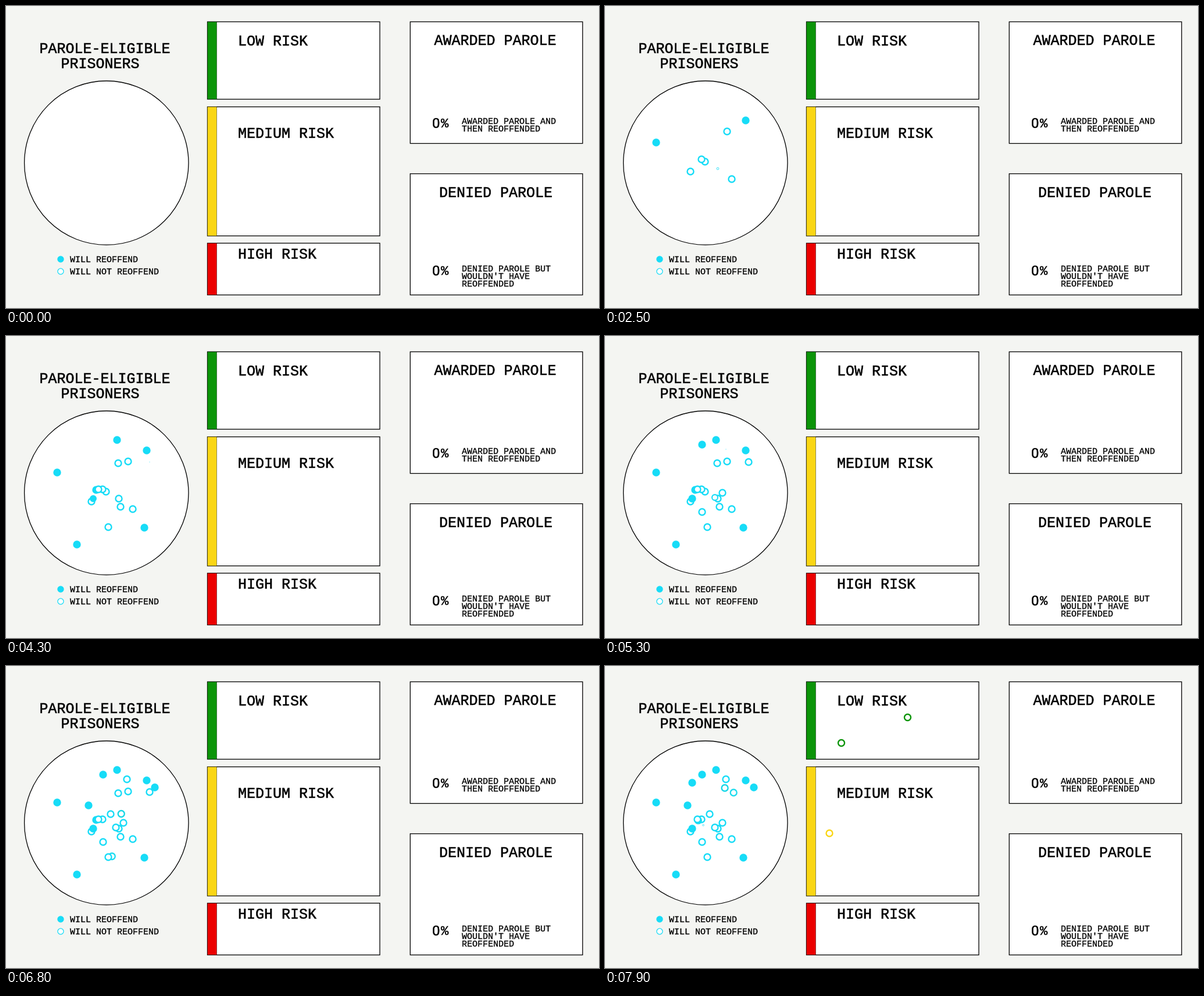
An HTML page for the animation above (8000 ms loop, 1020 px wide and 520 px high).

```html
<!DOCTYPE html>
<html lang="en">
<head>
<meta charset="utf-8">
<title>Parole risk</title>
<style>
  html, body { margin: 0; width: 100%; height: 100%; overflow: hidden; background: #f4f5f2; }
  svg { display: block; }
  text { font-family: "Liberation Mono", "Courier New", monospace; stroke: #000; stroke-width: .022em; }
  .title { font-size: 25px; }
  .label { font-size: 15px; }
  .zero { font: 24px Roboto, sans-serif; }
  .percent { font-size: 22px; }
  .frame { fill: #fff; stroke: #000; stroke-width: 1.3; }
  .bar { stroke: #000; stroke-opacity: .6; stroke-width: .7; }
</style>
</head>
<body>
<svg id="stage" width="1020" height="520" viewBox="0 0 1020 520"></svg>
<script>
const stage = document.getElementById("stage");
const LOOP = 8000, GROW = 500, TRAVEL = 1000;
const CYAN = [23, 220, 247], GREEN = [12, 148, 9], YELLOW = [250, 214, 21], RED = [235, 0, 0];

const rgb = color => `rgb(${color.map(Math.round)})`;
const mix = (a, b, k) => a + (b - a) * k;
function ease(u) {
  u = Math.min(1, Math.max(0, u));
  return u < .5 ? 4 * u ** 3 : 1 - 4 * (1 - u) ** 3;
}

function set(node, attrs) {
  for (const key in attrs) node.setAttribute(key, attrs[key]);
  return node;
}
function add(tag, attrs, content = "") {
  const node = set(document.createElementNS("http://www.w3.org/2000/svg", tag), attrs);
  node.textContent = content;
  return stage.appendChild(node);
}
const text = (x, y, content, cls = "title") => add("text", { x, y, class: cls }, content);
const box = (x, y, height) => add("rect", { x, y, width: 296.5, height, class: "frame" });

function riskBox(y, height, color, title, titleY) {
  box(346.5, y, height);
  add("rect", { x: 346.5, y, width: 16, height, fill: rgb(color), class: "bar" });
  text(399, titleY, title);
}

function outcomeBox(y, height, title, titleX, rowY, rows) {
  box(695.3, y, height);
  text(titleX, y + 40, title);
  text(733, rowY + 6.5, "0", "zero");
  text(748, rowY + 6, "%", "percent");
  rows.forEach((row, i) => text(784, rowY + 13 * i, row, "label"));
}

function drawDot(node, x, y, size, color, filled, line = 2.4) {
  set(node, {
    cx: x, cy: y, r: 5.5 * size, "stroke-width": line * size,
    stroke: rgb(color), fill: filled ? rgb(color) : "#fff"
  });
}

text(57.5, 80.5, "PAROLE-ELIGIBLE");
text(94.5, 106.5, "PRISONERS");
add("circle", { cx: 172.8, cy: 270.2, r: 141.2, class: "frame" });
["WILL REOFFEND", "WILL NOT REOFFEND"].forEach((label, i) => {
  const y = 436 + 21 * i;
  drawDot(add("circle", {}), 94, y, .92, CYAN, i === 0, 1.4);
  text(110, y + 4.5, label, "label");
});
riskBox(27.2, 133.3, GREEN, "LOW RISK", 67.5);
riskBox(173.6, 222.2, YELLOW, "MEDIUM RISK", 226.5);
riskBox(408.4, 89.1, RED, "HIGH RISK", 435);
outcomeBox(27.2, 209.4, "AWARDED PAROLE", 736.5, 203, ["AWARDED PAROLE AND", "THEN REOFFENDED"]);
outcomeBox(288.8, 208.7, "DENIED PAROLE", 745, 457, ["DENIED PAROLE BUT", "WOULDN'T HAVE", "REOFFENDED"]);

// Scatter in order of appearance; a trailing 1 marks a prisoner who will reoffend.
const scatter = [
  [172, 268], [147, 285], [218, 298], [88, 235, 1], [210, 216], [166, 264], [242, 197, 1],
  [194, 280], [197, 294], [191, 179, 1], [238, 330, 1], [176, 329], [193, 219], [122, 359, 1],
  [155, 265, 1], [159, 264], [150, 280, 1], [247, 217], [167, 303], [167, 187, 1], [202, 270],
  [189, 278], [208, 195], [256, 209, 1], [142, 240, 1], [176, 329], [180, 255], [150, 201, 1], [169, 274]
];

// Moments when the head count reaches a value; arrivals between them are evenly spaced.
const pace = [[0, -80], [3, 1020], [7, 2280], [16, 3950], [26, 5950], [28, 7700]];
function arrival(i) {
  const k = pace.findIndex(([count]) => count >= i) || 1;
  const [[n0, t0], [n1, t1]] = [pace[k - 1], pace[k]];
  return mix(t0, t1, (i - n0) / (n1 - n0));
}

// Sorted prisoners: scatter index -> departure and destination
const trips = {
  0: [6535, 520.5, 88.5], 11: [6606, 386, 288], 17: [7015, 407.5, 132],
  12: [7644, 386, 86], 4: [7683, 480, 265], 14: [7730, 420, 310]
};
const riskColor = y => y < 167 ? GREEN : y < 402 ? YELLOW : RED;

const dots = scatter.map(([x, y, filled], i) => {
  const [leave, toX, toY] = trips[i] || [LOOP, x, y];
  const goal = riskColor(toY), born = arrival(i), node = add("circle", {});
  return time => {
    const k = ease((time - leave) / TRAVEL);
    const color = CYAN.map((c, j) => mix(c, goal[j], k));
    drawDot(node, mix(x, toX, k), mix(y, toY, k), ease((time - born) / GROW), color, filled);
  };
});

const start = performance.now();
function tick() {
  const time = (performance.now() - start) % LOOP;
  dots.forEach(draw => draw(time));
  requestAnimationFrame(tick);
}
tick();
</script>
</body>
</html>
```
